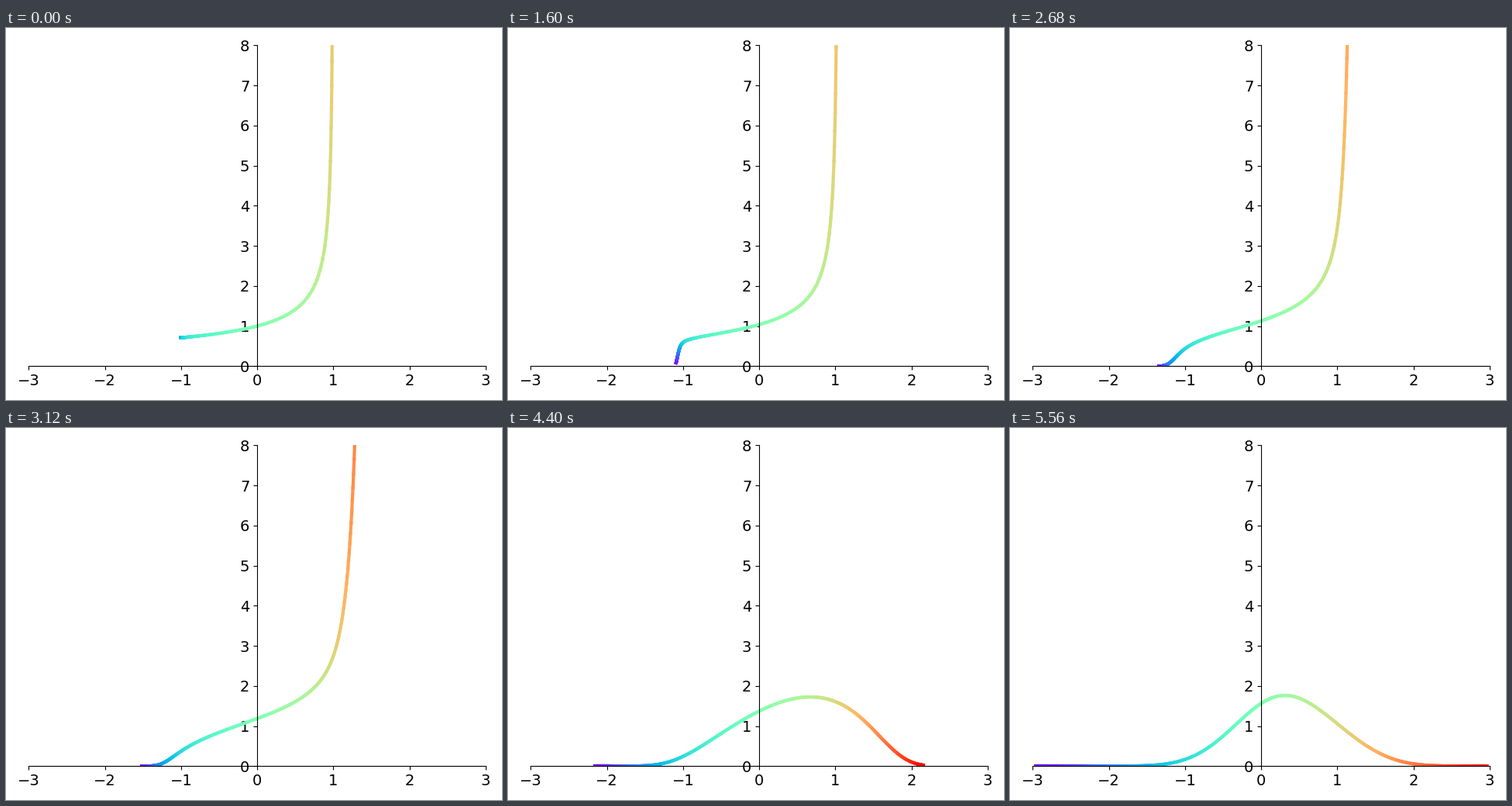
Recreate the animation shown at these times as a matplotlib script. Size 640x480 px, loop 5600 ms.

```python
import numpy as np
import matplotlib.pyplot as plt
from matplotlib.animation import FuncAnimation
from matplotlib.collections import LineCollection

FRAMES, INTERVAL = 140, 40
SEGMENTS = 200

# tanh-sinh substitution: s = tanh(u), u = pi/2 sinh(t)
t = np.linspace(-3, 3, SEGMENTS + 1)
u = np.pi / 2 * np.sinh(t)
s = np.tanh(u)
ds = np.pi / 2 * np.cosh(t) / np.cosh(u) ** 2
f = np.sqrt((1 + np.exp(2 * u)) / 2)  # 1 / sqrt(1 - s)


def progress(i):
    """Slow start up to 0.1, then steady up to 1."""
    return 0.002 * i if i < 50 else 0.1 + 0.01 * (i - 50)


def curve(p):
    """Blend from f(s) over s to f(s) ds/dt over t."""
    x = np.sign(t) * np.abs(s) ** (1 - p) * np.abs(t) ** p
    pts = np.column_stack([x, f * ds ** p])
    return np.stack([pts[:-1], pts[1:]], axis=1)


fig, ax = plt.subplots(figsize=(6.4, 4.8), dpi=100)
ax.set_xlim(-3, 3)
ax.set_ylim(0, 8)
ax.set_xticks(range(-3, 4))
ax.set_yticks(range(9))
ax.tick_params(labelsize=14)
ax.spines[["top", "right"]].set_visible(False)
ax.spines[["left", "bottom"]].set_position("zero")
fig.tight_layout()

line = LineCollection(curve(0), colors=plt.cm.rainbow(np.linspace(0, 1, SEGMENTS)),
                      linewidths=3, capstyle="projecting", zorder=2)
ax.add_collection(line, autolim=False)


def update(i):
    line.set_segments(curve(progress(i)))
    return (line,)


anim = FuncAnimation(fig, update, frames=FRAMES, interval=INTERVAL,
                     repeat=True, repeat_delay=0)
plt.show()
```
